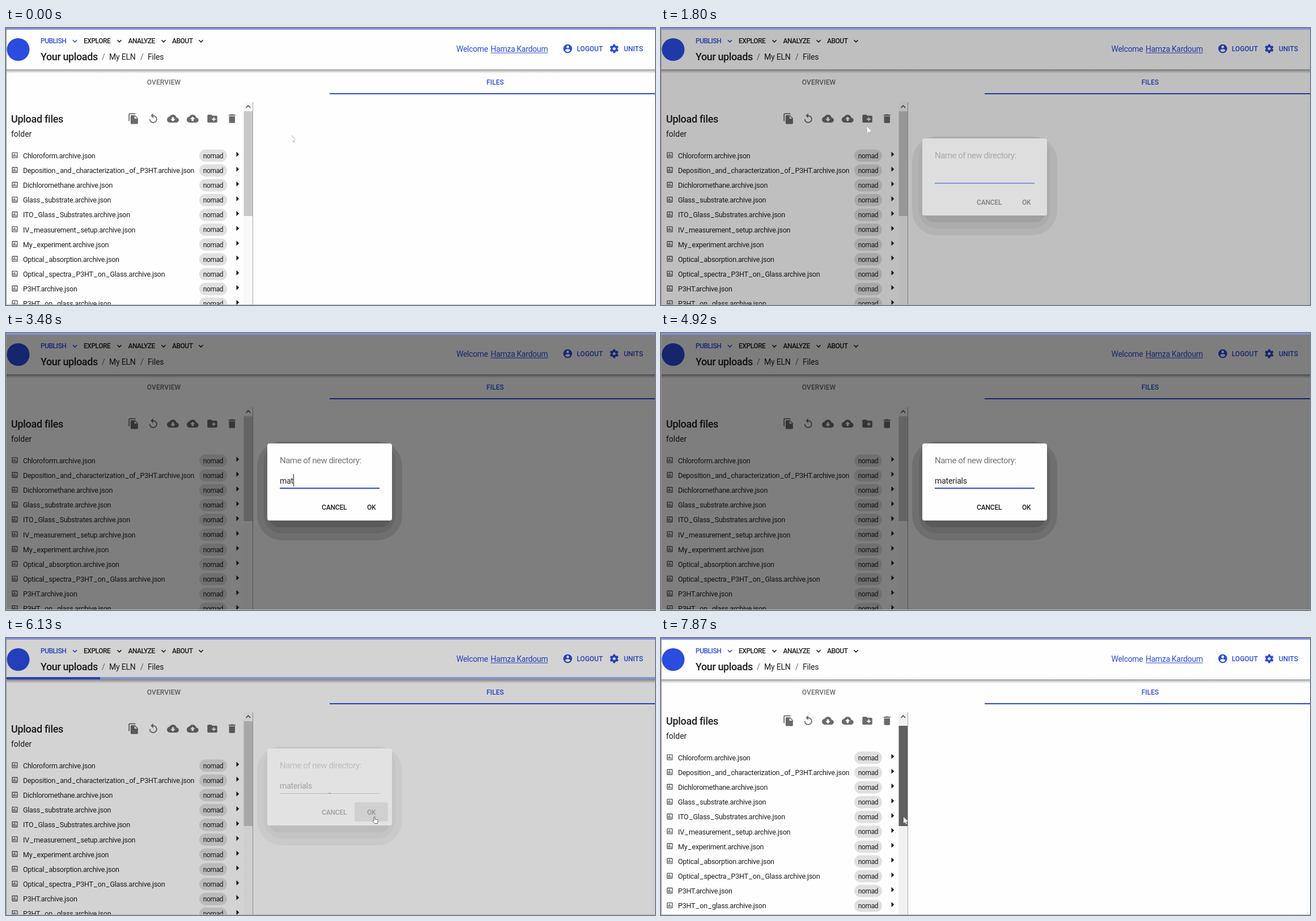
Animation, 1145 px wide and 489 px high, one loop 7990 ms. Source, as an HTML page with a canvas:

```html
<!DOCTYPE html>
<html lang="en">
<head>
<meta charset="utf-8">
<title>Create a new folder</title>
<style>
html, body { margin: 0; width: 100%; height: 100%; overflow: hidden; background: #fff }
canvas { display: block }
</style>
</head>
<body>
<canvas id="stage" width="1145" height="489"></canvas>
<script>
const c = document.getElementById('stage').getContext('2d');
const LOOP = 7990, BLUE = '#2a4cdf', INK = '#1f1f1f', GREY = '#6a6a6a';

// Material-style icons on a 24 unit grid
const cloud = 'M19.35 10.04C18.67 6.59 15.64 4 12 4 9.11 4 6.6 5.64 5.35 8.04 2.34 8.36 0 10.91 0 14c0 3.31 2.69 6 6 6h13c2.76 0 5-2.24 5-5 0-2.64-2.05-4.78-4.65-4.96z';
const tools = [
  'M16 1H4c-1.1 0-2 .9-2 2v14h2V3h12V1zm-1 4l6 6v10c0 1.1-.9 2-2 2H8c-1.1 0-2-.9-2-2V7c0-1.1.9-2 2-2h7zm-1 7h5.5L14 6.5V12z',
  'M12 5V1L7 6l5 5V7c3.31 0 6 2.69 6 6s-2.69 6-6 6-6-2.69-6-6H4c0 4.42 3.58 8 8 8s8-3.58 8-8-3.58-8-8-8z',
  cloud + 'M17 13l-5 5-5-5h3V9h4v4z',
  cloud + 'M14 13v4h-4v-4H7l5-5 5 5z',
  'M20 6h-8l-2-2H4c-1.1 0-2 .9-2 2v12c0 1.1.9 2 2 2h16c1.1 0 2-.9 2-2V8c0-1.1-.9-2-2-2zm-1 8h-3v3h-2v-3h-3v-2h3V9h2v3h3z',
  'M6 19c0 1.1.9 2 2 2h8c1.1 0 2-.9 2-2V7H6zM19 4h-3.5l-1-1h-5l-1 1H5v2h14z'
].map(d => new Path2D(d));
const chart = new Path2D('M5 3h14q2 0 2 2v14q0 2-2 2H5q-2 0-2-2V5q0-2 2-2zM5 5v14h14V5zM7 10h2v7H7zM11 7h2v10h-2zM15 13h2v4h-2z');
const account = new Path2D('M2 12a10 10 0 1 0 20 0a10 10 0 1 0-20 0zM9 8a3 3 0 1 1 6 0a3 3 0 1 1-6 0zM6 16c0-2 4-3.1 6-3.1s6 1.1 6 3.1a7.2 7.2 0 0 1-12 0z');
const arrow = new Path2D('M0 0V11L2.6 8.8 4.3 12.6 6.2 11.8 4.5 8.1 8 7.8z');
const arrowEdge = new Path2D('M.5 .5L7.5 7.5M4.6 8.4L6.2 11.6 4.4 12.5 3.2 10');
const hand = new Path2D('M3 7.5V1.2q1-1.4 2 0V5l4.5 1q1 .3 .9 1.4L9.8 10 9 12.5H4.5L1 8.6q-.2-1.6 2-1.1z');

const files = ['Chloroform', 'Deposition_and_characterization_of_P3HT', 'Dichloromethane',
  'Glass_substrate', 'ITO_Glass_Substrates', 'IV_measurement_setup', 'My_experiment',
  'Optical_absorption', 'Optical_spectra_P3HT_on_Glass', 'P3HT', 'P3HT_on_glass'];

// Held values: [start time, ...values]
const pointer = [
  [0, 503, 189, 'arrow'], [690, 495, 187, 'arrow'], [827, 470, 183, 'arrow'], [964, 440, 178, 'arrow'],
  [1101, 410, 174, 'arrow'], [1238, 385, 170, 'arrow'], [1375, 366, 166, 'arrow'], [1512, 351, 162, 'hand'],
  [1800, 364, 174, 'arrow'], [2080, 452, 233, 'arrow'], [2780, 0, 0, ''],
  [5350, 470, 240, 'arrow'], [5500, 560, 275, 'arrow'], [5650, 630, 305, 'hand'], [5800, 646, 315, 'hand'],
  [6250, 646, 316, 'arrow'], [6690, 600, 310, 'arrow'], [6830, 480, 312, 'arrow'], [6970, 375, 314, 'arrow'],
  [7110, 395, 315, 'arrow'], [7240, 415, 316, 'arrow'], [7370, 428, 316, 'arrow']
];
const modal = [[0, 0], [1800, .5], [1950, 1], [6130, .34], [6250, 0]];
const scroll = [[0, 0], [7750, 7], [7870, 14]];
const caret = [[0, 0], [1950, 1], [2350, 0], [2780, 1], [4920, 0], [5350, 1], [5800, 0]];
const keys = [2780, 3050, 3330, 3490, 3650, 3820, 4150, 4400, 4520];

const held = (track, t) => track.findLast(k => k[0] <= t).slice(1);
const within = (t, a, b) => t >= a && t < b;

function box(x, y, w, h, color, r = 0) {
  c.fillStyle = color;
  c.beginPath();
  c.roundRect(x, y, w, h, r);
  c.fill();
}

function text(s, x, y, size, color = INK, track = 0, weight = 400, align = 'left') {
  c.font = `${weight} ${size}px Roboto, sans-serif`;
  c.letterSpacing = track + 'px';
  c.textAlign = align;
  c.fillStyle = color;
  c.fillText(s, x, y);
  return c.measureText(s).width;
}

function icon(path, x, y, scale, color) {
  c.save();
  c.translate(x, y);
  c.scale(scale, scale);
  c.translate(-12, -12);
  c.fillStyle = color;
  c.fill(path, 'evenodd');
  c.restore();
}

function chevron(x, y, w, h, color) {
  c.strokeStyle = color;
  c.lineWidth = 1.6;
  c.beginPath();
  c.moveTo(x - w, y - h);
  c.lineTo(x, y + h);
  c.lineTo(x + w, y - h);
  c.stroke();
}

function disc(x, y, r, color) {
  c.fillStyle = color;
  c.beginPath();
  c.arc(x, y, r, 0, 7);
  c.fill();
}

function gear(x, y) {
  c.save();
  c.translate(x, y);
  for (let i = 0; i < 6; i++) {
    c.rotate(Math.PI / 3);
    box(-2, -7.7, 4, 4, BLUE, .6);
  }
  c.strokeStyle = BLUE;
  c.lineWidth = 3.4;
  c.beginPath();
  c.arc(0, 0, 4.3, 0, 7);
  c.stroke();
  c.restore();
}

function header(t) {
  const shade = c.createLinearGradient(0, 73, 0, 80);
  shade.addColorStop(0, '#989898');
  shade.addColorStop(.4, '#c8c8c8');
  shade.addColorStop(1, '#fefefe');
  box(0, 73, 1145, 7, shade);
  disc(21.5, 38, 20, BLUE);

  [['PUBLISH', 61, 121.5], ['EXPLORE', 137, 200], ['ANALYZE', 215.5, 278], ['ABOUT', 293, 344]]
    .forEach(([s, x, v], i) => {
      const color = i ? INK : BLUE;
      text(s, x, 27, 12, color, -.5, 500);
      chevron(v, 23, 3.6, 1.8, color);
    });
  text('Your uploads', 61, 56.5, 18, INK, -.4, 500);
  text('/', 169, 55.5, 14, '#666');
  text('My ELN', 182, 55.5, 14, INK, -.2);
  text('/', 237, 55.5, 14, '#666');
  text('Files', 250, 55.5, 14, INK, -.2);

  text('Welcome', 794.5, 42, 14, BLUE, -.3);
  const w = text('Hamza Kardoum', 855, 42, 14, BLUE, -.3);
  box(855, 43.5, w, 1, BLUE);
  icon(account, 991, 36.5, .78, BLUE);
  text('LOGOUT', 1007, 41.3, 12, BLUE, 0, 500);
  gear(1073, 36.5);
  text('UNITS', 1090, 41.3, 12, BLUE, 0, 500);

  if (within(t, 6130, 6250)) {
    box(0, 69, 1145, 4, '#a1b0f2');
    box(0, 69, 166, 4, BLUE);
  }
  text('OVERVIEW', 278.5, 100, 12, GREY, .1, 500, 'center');
  text('FILES', 863, 100, 12, BLUE, 0, 500, 'center');
  box(571, 115, 574, 2, BLUE);
}

// Underscores get a little room on both sides
function fileName(s, x, y) {
  for (const part of s.split(/(_)/)) {
    const room = part === '_' ? 1.4 : 0;
    x += room + text(part, x + room, y, 12.5, INK, -.25) + room;
  }
}

function list(t) {
  const [top] = held(scroll, t);
  c.save();
  c.beginPath();
  c.rect(0, 131, 436, 358);
  c.clip();
  c.translate(0, -top);
  text('Upload files', 9, 167, 18, INK, -.3, 500);
  text('folder', 9, 191.5, 14);
  if (within(t, 1512, 1800)) disc(364, 162, 12, '#f1f1f1');
  tools.forEach((p, i) => icon(p, 225 + 34.75 * i, 160, .87, GREY));
  files.forEach((name, i) => {
    const y = 225.3 + 26.15 * i;
    if (i === 3 && within(t, 6970, 7240)) box(1, y - 13.3, 418, 26, '#dfdfdf');
    icon(chart, 15.5, y - .8, .56, '#333');
    fileName(name + '.archive.json', 30, y + 4.5);
    box(341, y - 10.8, 49, 21.6, '#e0e0e0', 10.8);
    text('nomad', 365.5, y + 4.4, 12, INK, -.4, 400, 'center');
    c.fillStyle = '#111';
    c.beginPath();
    c.moveTo(406.5, y - 6.8);
    c.lineTo(411.2, y - 2.3);
    c.lineTo(406.5, y + 2.2);
    c.fill();
  });
  c.restore();

  box(419, 131, 16, 357, t < 7500 ? '#f9f9f9' : '#f1f1f1');
  chevron(427.3, 139, 3.8, -2, '#505050');
  box(419.5, 147 + top * 8 / 14, 15.5, t < 6830 ? 185 : 177,
    t >= 7500 ? '#606060' : t >= 7370 ? '#a8a8a8' : '#c9c9c9');
  box(435, 131, 1, 357, '#a8a8a8');
  box(1140, 131, 1, 357, '#f0f0f0');
}

function tooltip() {
  box(316.5, 184, 95, 22, '#6a6a6a', 4);
  text('create new folder', 364, 199, 11, '#fff', -.3, 400, 'center');
}

// The shadow stays outside the paper, so a fading dialog keeps an even tone
function dialogShadow() {
  c.save();
  c.beginPath();
  c.rect(0, 0, 1145, 489);
  c.roundRect(461, 195, 220, 136, 4);
  c.clip('evenodd');
  box(443, 191, 256, 175, 'rgba(0,0,0,.12)', 44);
  box(455, 193, 232, 161, 'rgba(0,0,0,.08)', 32);
  box(464, 200, 214, 143, 'rgba(0,0,0,.12)', 18);
  c.restore();
}

function dialog(t) {
  const [alpha] = held(modal, t);
  if (!alpha) return;
  box(0, 3, 1145, 486, `rgba(0,0,0,${alpha / 2})`);
  c.save();
  c.globalAlpha = alpha;
  dialogShadow();
  box(461, 195, 220, 136, '#fefefe', 4);
  if (t >= 5650) box(615, 290, 59, 34, t < 6130 ? '#f0f0f0' : '#aeaeae', 4);
  text('Name of new directory:', 483, 230, 15, '#757575', -.5);
  const typed = 'materials'.slice(0, keys.filter(k => k <= t).length);
  const w = text(typed, 483, 266, 14, INK, -.15);
  if (held(caret, t)[0]) box(Math.round(483 + w), 249, 1, 22, INK);
  if (t < 6130) {
    box(483, 273, 176, 2, BLUE);
  } else {
    box(483, 274, 176, 1, '#777');
    box(569, 273, 4, 2, BLUE);
  }
  text('CANCEL', 557, 312, 12, INK, -.2, 500);
  text('OK', 637, 312, 12, INK, -.2, 500);
  c.restore();
}

function cursor(t) {
  const [x, y, kind] = held(pointer, t);
  if (!kind) return;
  c.save();
  c.translate(x, y);
  c.fillStyle = '#fff';
  c.strokeStyle = kind === 'hand' ? '#555' : '#999';
  c.lineWidth = .9;
  c.fill(kind === 'hand' ? hand : arrow);
  c.stroke(kind === 'hand' ? hand : arrowEdge);
  c.restore();
}

function draw(t) {
  box(0, 0, 1145, 489, '#fefefe');
  header(t);
  list(t);
  if (within(t, 1650, 1800)) tooltip();
  dialog(t);
  box(0, 0, 1145, 3, '#8292dc');
  box(0, 3, 1, 486, '#8f8f8f');
  box(0, 488, 1145, 1, '#b8b8b8');
  cursor(t);
}

const start = performance.now();
function tick() {
  draw((performance.now() - start) % LOOP);
  requestAnimationFrame(tick);
}
tick();
</script>
</body>
</html>
```
